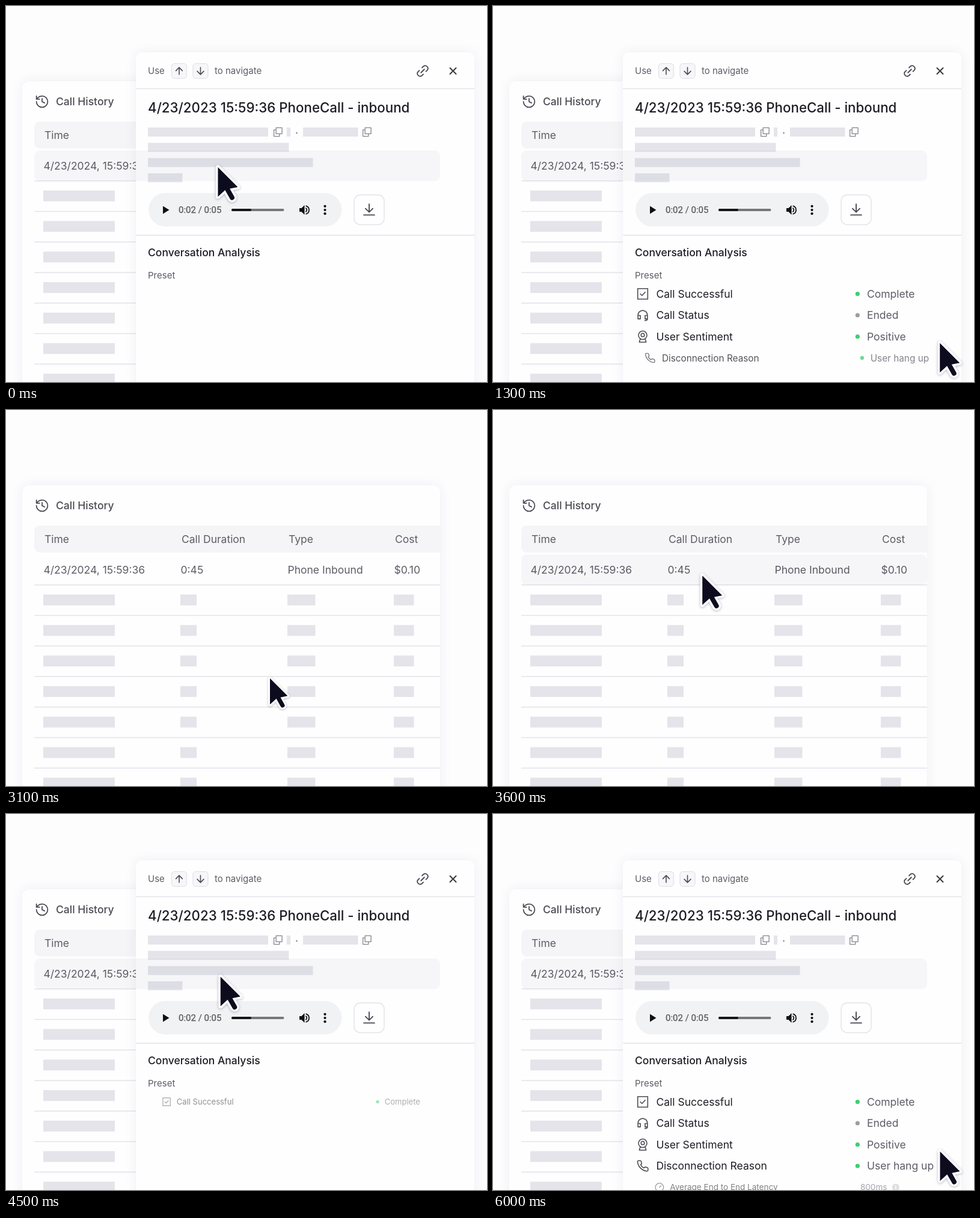
Animation, 800 px wide and 625 px high, one loop 6100 ms. Source, as an HTML page:

```html
<!DOCTYPE html>
<html lang="en">
<head>
<meta charset="utf-8">
<title>Call history</title>
<style>
  html, body { margin: 0; width: 100%; height: 100%; overflow: hidden; background: #fdfdfe; }
  svg { display: block; width: 100vw; height: 100vh; }
  text { font-family: Inter, sans-serif; white-space: pre; }
  .card { fill: #fefeff; filter: drop-shadow(0 0 9px rgba(30, 30, 70, .07)); }
  .icon { fill: none; stroke-linecap: round; stroke-linejoin: round; }
  .pop { transform-box: fill-box; transform-origin: center; }
  #drawer { transform-origin: 497.5px 458px; }
  .outline { fill: #fff; stroke: #fff; stroke-linejoin: round; filter: drop-shadow(0 1px 2px rgba(20, 20, 50, .3)); }
</style>
</head>
<body>
<svg viewBox="0 0 800 625">
  <g id="list"></g>
  <g id="drawer"></g>
  <rect id="highlight" x="47" y="240" width="675" height="51" rx="9" fill="#14143c" fill-opacity=".03"/>
  <g id="cursor">
    <g class="outline">
      <path d="M0 0V49L13 37L33 33Z" stroke-width="7"/>
      <path d="M13 32L23.5 50.5" stroke-width="15" stroke-linecap="round"/>
    </g>
    <g fill="#0d0b1e" stroke="#0d0b1e" stroke-linecap="round">
      <path d="M0 0V49L13 37L33 33Z" stroke="none"/>
      <path d="M13 32L23.5 50.5" stroke-width="8"/>
    </g>
  </g>
</svg>
<script>
const $ = id => document.getElementById(id);
const INK = '#1d1d24', GRAY = '#5c5c65', LINE = '#e3e3e9', BAR = '#e4e4ea';

// y is the middle of the capitals
const text = (x, y, content, size = 17.5, fill = GRAY, extra = '') =>
  `<text x="${x}" y="${y + size * .364}" font-size="${size}" fill="${fill}" ${extra}>${content}</text>`;
const box = (x, y, w, h, fill = BAR, extra = '') =>
  `<rect x="${x}" y="${y}" width="${w}" height="${h}" fill="${fill}" ${extra}/>`;
const dot = (x, y, r, fill) => `<circle cx="${x}" cy="${y}" r="${r}" fill="${fill}"/>`;
const rule = (x1, x2, y) => `<path d="M${x1} ${y}H${x2}" stroke="${LINE}" stroke-width="1.4"/>`;
// Icons are drawn on a 24-unit grid centred on (x, y)
const icon = (x, y, size, d, stroke = GRAY, width = 1.7) =>
  `<path class="icon" transform="translate(${x} ${y}) scale(${size / 24}) translate(-12 -12)"
    d="${d}" stroke="${stroke}" stroke-width="${width * 24 / size}"/>`;

const MEDIUM = 'font-weight="500"';
const circle = (cx, cy, r) => `M${cx - r} ${cy}a${r} ${r} 0 1 0 ${2 * r} 0a${r} ${r} 0 1 0 ${-2 * r} 0`;
const ICONS = {
  history: 'M3 12a9 9 0 1 0 9-9 9.75 9.75 0 0 0-6.7 2.7L3 8M3 3v5h5M12 7v5l4 2',
  up: 'M12 19V5M5.5 11.5L12 5l6.5 6.5',
  down: 'M12 5v14M5.5 12.5L12 19l6.5-6.5',
  link: 'M9 15l6-6M11 6l2.5-2.5a5 5 0 0 1 7 7L18 13M13 18l-2.5 2.5a5 5 0 0 1-7-7L6 11',
  close: 'M6 6l12 12M18 6L6 18',
  copy: 'M8 2h14v14H8zM8 7H3v15h13v-6',
  download: 'M12 2v14M5.5 10l6.5 6.5L18.500 10M2.500 21.500h19',
  check: 'M2.500 2h19v20h-19zM7.500 12l3.200 3.200 5.800-6.400',
  headset: 'M3 17v-5a9 9 0 0 1 18 0v5M3 12.500h4.500v6.500H3zM16.500 12.500H21v6.500h-4.500zM21 19c0 2-2 3-5 3',
  person: circle(12, 9.5, 8) + circle(12, 9, 3.2) + 'M7.500 16L5.500 22.500h13L16.500 16',
  phone: 'M22 16.92v3a2 2 0 0 1-2.18 2 19.79 19.79 0 0 1-8.63-3.07 19.5 19.5 0 0 1-6-6 19.79 19.79 0 0 1-3.07-8.67A2 2 0 0 1 4.11 2h3a2 2 0 0 1 2 1.72c.13.96.36 1.9.7 2.81a2 2 0 0 1-.45 2.11L8.09 9.91a16 16 0 0 0 6 6l1.27-1.27a2 2 0 0 1 2.11-.45c.91.34 1.85.57 2.81.7A2 2 0 0 1 22 16.92z',
  gauge: circle(12, 12, 10) + 'M11.500 12.500l4.500-4.500'
};

function buildList() {
  const columns = [
    ['Time', 64, '4/23/2024, 15:59:36', 62.5, 119],
    ['Call Duration', 292, '0:45', 290.5, 27],
    ['Type', 470, 'Phone Inbound', 468.5, 46.5],
    ['Cost', 647, '$0.10', 645.5, 33.5]
  ];
  let out = '<rect class="card" x="27" y="125" width="695" height="560" rx="12"/>' +
    icon(60, 159, 25, ICONS.history, '#4b4b53', 1.8) +
    text(83, 159, 'Call History', 17.5, '#4b4b53', MEDIUM) +
    '<path d="M722 192H56a9 9 0 0 0-9 9v27a9 9 0 0 0 9 9H722z" fill="#f5f5f8"/>';
  for (const [title, titleX, value, x, width] of columns) {
    out += text(titleX, 215, title) + text(x, 265.5, value);
    for (let i = 0; i < 7; i++) out += box(x - .5, 306.7 + 50.75 * i, width, 18);
  }
  for (let i = 0; i < 7; i++) out += rule(47, 722, 290.7 + 50.75 * i);
  $('list').innerHTML = out;
}

function buildPlayer() {
  return box(237, 311, 321.5, 55.5, '#f1f2f4', 'rx="27.75"') +
    '<path d="M261 332.500v13l10.500-6.500z" fill="#111"/>' +
    text(287, 339, '0:02 / 0:05', 15, '#58585c', 'style="font-family:Roboto,sans-serif" stroke="#58585c" stroke-width=".25"') +
    box(375, 337, 87.5, 4, '#77777b', 'rx="2"') + box(375, 337, 33, 4, '#161618', 'rx="2"') +
    '<path d="M488 336h3.500l5-5v16l-5-5H488z" fill="#111"/>' +
    icon(496, 339, 20, 'M15.500 8.500a4.500 4.500 0 0 1 0 7M16 4a8.500 8.500 0 0 1 0 16', '#111', 1.8) +
    [332.8, 339, 345.2].map(y => dot(530.5, y, 2.1, '#111')).join('');
}

const GREEN = '#3ccf70';
const details = [
  ['check', 'Call Successful', 'Complete', GREEN],
  ['headset', 'Call Status', 'Ended', '#9c9ca5', '137% 50%'],
  ['person', 'User Sentiment', 'Positive', GREEN],
  ['phone', 'Disconnection Reason', 'User hang up', GREEN],
  ['gauge', 'Average End to End Latency', '800ms']
];

function buildDetail([glyph, label, value, color, origin = 'center'], i) {
  const y = 478.5 + 35.5 * i;
  const shown = color
    ? dot(606.3, y, 3.6, color) + text(622, y, value)
    : text(601.5, y, value) + dot(677.5, y, 7.8, '#c6c6cd') +
      dot(677.5, y - 3.3, 1.2, '#fff') + box(676.5, y - 1, 2, 5.5, '#fff');
  return `<g class="detail"><g class="pop">${icon(249, y, 21, ICONS[glyph], '#4b4b53', 1.6)}${text(271.5, y, label, 17.5, INK)}</g>` +
    `<g class="pop" style="transform-origin:${origin}">${shown}</g></g>`;
}

function buildDrawer() {
  const key = (x, d) => box(x, 95.7, 25, 24.6, '#f7f7fa', `rx="5" stroke="${LINE}" stroke-width="1.3"`) +
    icon(x + 12.5, 108, 20, d, '#4b4b53', 1.6);
  $('drawer').innerHTML = '<rect class="card" x="216" y="77" width="563" height="762" rx="10"/>' +
    text(236, 108, 'Use', 15) + key(275.5, ICONS.up) + key(311, ICONS.down) +
    text(347, 108, 'to navigate', 15) +
    icon(693, 108, 22, ICONS.link, '#45454d', 1.8) + icon(743.5, 108, 20, ICONS.close, '#35353c', 1.9) +
    rule(216, 779, 137.5) +
    text(236, 169, '4/23/2023 15:59:36 PhoneCall - inbound', 22.3, INK, MEDIUM) +
    box(236, 202, 200, 15) + icon(452, 209.5, 17, ICONS.copy, '#85858e', 1.3) + box(467, 202, 6, 15) +
    dot(483.5, 211, 1.3, '#85858e') + box(494, 202, 91.5, 15) + icon(600, 209.5, 17, ICONS.copy, '#85858e', 1.3) +
    box(236, 227.5, 234.5, 15) + box(236, 252.7, 274.5, 15) + box(236, 278, 57.5, 15) +
    buildPlayer() +
    box(579, 314, 50, 49.5, '#fefeff', `rx="10" stroke="${LINE}" stroke-width="1.4"`) +
    icon(604, 338.5, 22.5, ICONS.download, '#45454d', 1.8) +
    rule(216, 779, 381) +
    text(236, 410, 'Conversation Analysis', 17.5, INK, MEDIUM) + text(236, 448, 'Preset', 15) +
    details.map(buildDetail).join('');
}

const LOOP = 6100, STEP = 100, CYCLE = 4400, RESET = 3100;
const POP_TIME = 500, STAGGER = 371, DRAWER_START = 3871, HOVER = 3500;

// time, x, y, scale
const cursorPath = [
  [0, 352.5, 268, 1], [700, 719, 487, 1], [1400, 743.5, 561, 1], [RESET - 1, 743.5, 561, 1],
  [RESET, 439, 446, .89], [3700, 346.5, 272, 1], [4100, 346.5, 272, 1], [CYCLE, 352.5, 268, 1]
];

const clamp = p => Math.min(1, Math.max(0, p));
const easeOut = p => 1 - (1 - clamp(p)) ** 3;
const easeInOut = p => p < .5 ? 4 * p ** 3 : 1 - 4 * (1 - p) ** 3;

function pop(element, progress) {
  element.style.opacity = progress;
  element.style.transform = `scale(${.5 + progress / 2})`;
}

function cursorAt(t) {
  const next = cursorPath.findIndex(point => point[0] > t);
  const from = cursorPath[next - 1], to = cursorPath[next];
  const p = easeInOut((t - from[0]) / (to[0] - from[0]));
  return from.map((value, i) => value + (to[i] - value) * p);
}

function render(time) {
  const t = Math.floor(time % LOOP / STEP) * STEP % CYCLE;
  const open = t < RESET;
  pop($('drawer'), open ? 1 : easeOut((t - DRAWER_START) / POP_TIME));
  rows.forEach((row, i) => {
    const progress = open ? easeOut((t - i * STAGGER) / POP_TIME) : 0;
    for (const part of row.children) pop(part, progress);
  });
  $('highlight').style.opacity = open || t >= HOVER ? 1 : 0;
  const [, x, y, scale] = cursorAt(t);
  $('cursor').setAttribute('transform', `translate(${x} ${y}) scale(${scale})`);
}

buildList();
buildDrawer();
const rows = [...document.querySelectorAll('.detail')];
const start = performance.now();
function tick() {
  render(performance.now() - start);
  requestAnimationFrame(tick);
}
tick();
</script>
</body>
</html>
```
